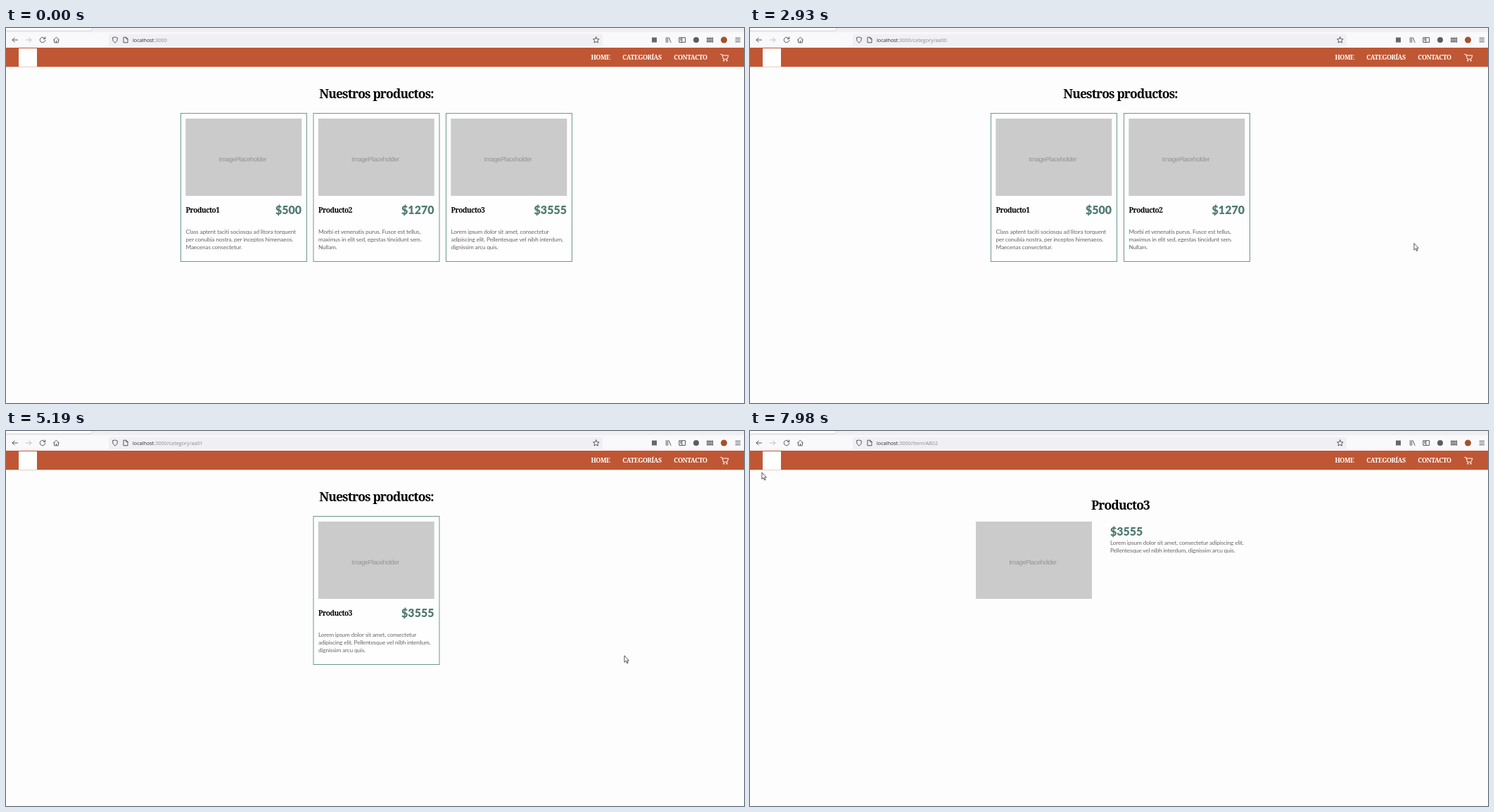
An HTML page that plays this animation: 1049 px wide and 534 px high, repeating every 8000 ms.

```html
<!DOCTYPE html>
<html lang="es">
<head>
<meta charset="utf-8">
<title>Productos</title>
<style>
  html, body { margin: 0; width: 100%; height: 100%; overflow: hidden; background: #fdfdfd; }
  svg { display: block; width: 1049px; height: 534px; }

  .slab { font-family: "Roboto Slab", "Noto Serif", serif; font-weight: 700; letter-spacing: -.05em; }
  .mid { text-anchor: middle; }
  .end { text-anchor: end; }
  .h1 { font-size: 17.5px; }
  .h2 { font-size: 13.1px; }
  .h3 { font-size: 10.1px; }
  .nav { font-size: 9px; fill: #fff; }
  .sub { font-size: 8.6px; fill: #fff; }
  .price { font: 900 16px Lato, sans-serif; fill: #4f7b72; }
  .desc { font: 8.3px Lato, sans-serif; letter-spacing: -.02em; fill: #666; }
  .photo { font: 9.3px "Liberation Sans", Arial, sans-serif; letter-spacing: -.05em; fill: #949494; }
  .url { font: 7.25px "Open Sans", sans-serif; fill: #8b8b8e; }
  .url .host { fill: #2a2a2e; }
  .icon { fill: none; stroke: #56565b; stroke-width: 1; stroke-linecap: round; stroke-linejoin: round; }
  .cursor { fill: #fff; stroke: #26262a; stroke-width: .8; stroke-linejoin: round; }

  .step { animation: 8s step-end infinite; }
  #all, #urlHome { animation-name: untilFirst; }
  #urlOne { animation-name: urlOne; }
  #urlTwo { animation-name: urlTwo; }
  #urlItem { animation-name: urlItem; }
  #title { animation-name: title; }
  #wait { animation-name: wait; }
  #catOne { animation-name: catOne; }
  #catTwo { animation-name: catTwo; }
  #waitItem { animation-name: waitItem; }
  #item { animation-name: item; }
  #menu { animation-name: menu; }
  #hoverOne { animation-name: hoverOne; }
  #hoverTwo { animation-name: hoverTwo; }
  #arrow { animation-name: arrow; }
  #hand { animation-name: hand; }
  #pointer { animation: travel 8s linear infinite; }

  @keyframes untilFirst { 0% { opacity: 1 } 23.875%, 100% { opacity: 0 } }
  @keyframes urlOne { 0%, 51.25%, 100% { opacity: 0 } 23.875% { opacity: 1 } }
  @keyframes urlTwo { 0%, 74.25%, 100% { opacity: 0 } 51.25% { opacity: 1 } }
  @keyframes urlItem { 0% { opacity: 0 } 74.25%, 100% { opacity: 1 } }
  @keyframes title { 0% { opacity: 1 } 74.25%, 100% { opacity: 0 } }
  @keyframes wait { 0%, 36.625%, 64.875%, 100% { opacity: 0 } 23.875%, 51.25% { opacity: 1 } }
  @keyframes catOne { 0%, 51.25%, 100% { opacity: 0 } 36.625% { opacity: 1 } }
  @keyframes catTwo { 0%, 74.25%, 100% { opacity: 0 } 64.875% { opacity: 1 } }
  @keyframes waitItem { 0%, 87.75%, 100% { opacity: 0 } 74.25% { opacity: 1 } }
  @keyframes item { 0% { opacity: 0 } 87.75%, 100% { opacity: 1 } }
  @keyframes menu { 0%, 28%, 54.625%, 100% { opacity: 0 } 16.25%, 43.5% { opacity: 1 } }
  @keyframes hoverOne { 0%, 27.125%, 47.875%, 100% { opacity: 0 } 18.875%, 46.125% { opacity: 1 } }
  @keyframes hoverTwo { 0%, 28%, 54.625%, 100% { opacity: 0 } 27.125%, 47.875% { opacity: 1 } }
  @keyframes arrow {
    0%, 9.25%, 16.25%, 43.5%, 71.625% { opacity: 0 }
    5.75%, 13.625%, 28%, 54.625%, 74.25%, 100% { opacity: 1 }
  }
  @keyframes hand {
    0%, 13.625%, 28%, 54.625%, 74.25%, 100% { opacity: 0 }
    9.25%, 16.25%, 43.5%, 71.625% { opacity: 1 }
  }
  /* the pointer jumps every 70 ms */
  @keyframes travel {
    0% { transform: translate(341px, 513px) }
    5.75% { transform: translate(341px, 513px); animation-timing-function: steps(12, start) }
    16.25% { transform: translate(903px, 74px); animation-timing-function: steps(1, start) }
    17.125% { transform: translate(906px, 46px); animation-timing-function: steps(6, start) }
    22.375% { transform: translate(889px, 67.5px) }
    27.125% { transform: translate(889px, 67.5px); animation-timing-function: steps(9, start) }
    35% { transform: translate(943.8px, 306.5px) }
    39.125% { transform: translate(943.8px, 306.5px); animation-timing-function: steps(6, start) }
    44.375% { transform: translate(908px, 30px); animation-timing-function: steps(6, start) }
    49.625% { transform: translate(894.5px, 95px) }
    51.25% { transform: translate(894.5px, 95px); animation-timing-function: steps(1, start) }
    52.125% { transform: translate(896px, 95.5px) }
    54.625% { transform: translate(896px, 95.5px); animation-timing-function: steps(7, start) }
    60.75% { transform: translate(879px, 319.8px) }
    68.125% { transform: translate(879px, 319.8px); animation-timing-function: steps(7, start) }
    74.25% { transform: translate(460px, 201px) }
    75.125% { transform: translate(460px, 201px); animation-timing-function: steps(4, start) }
    78.625% { transform: translate(511px, 357px); animation-timing-function: steps(2, start) }
    80.375% { transform: translate(517px, 409px) }
    91.875% { transform: translate(517px, 409px); animation-timing-function: steps(9, start) }
    99.75% { transform: translate(66px, 94px); animation-timing-function: steps(1, start) }
    100% { transform: translate(16.8px, 59px) }
  }
</style>
</head>
<body>
<svg viewBox="0 0 1049 534">
  <defs>
    <g id="photo">
      <rect width="165" height="110" fill="#cbcbcb"/>
      <text class="photo mid" x="81" y="60.5">ImagePlaceholder</text>
    </g>
    <g id="frame">
      <rect x=".5" y="121.5" width="179" height="211" fill="#fefefe" stroke="#6d978f"/>
      <use href="#photo" x="7.3" y="129"/>
    </g>
    <g id="p1">
      <use href="#frame"/>
      <text class="slab h3" x="7.5" y="262.5">Producto1</text>
      <text class="price end" x="172" y="264.5">$500</text>
      <text class="desc">
        <tspan x="7.5" y="292.5">Class aptent taciti sociosqu ad litora torquent</tspan>
        <tspan x="7.5" y="303.5">per conubia nostra, per inceptos himenaeos.</tspan>
        <tspan x="7.5" y="314.5">Maecenas consectetur.</tspan>
      </text>
    </g>
    <g id="p2">
      <use href="#frame"/>
      <text class="slab h3" x="7.5" y="262.5">Producto2</text>
      <text class="price end" x="172" y="264.5">$1270</text>
      <text class="desc">
        <tspan x="7.5" y="292.5">Morbi et venenatis purus. Fusce est tellus,</tspan>
        <tspan x="7.5" y="303.5">maximus in elit sed, egestas tincidunt sem.</tspan>
        <tspan x="7.5" y="314.5">Nullam.</tspan>
      </text>
    </g>
    <g id="p3">
      <use href="#frame"/>
      <text class="slab h3" x="7.5" y="262.5">Producto3</text>
      <text class="price end" x="172" y="264.5">$3555</text>
      <text class="desc">
        <tspan x="7.5" y="292.5">Lorem ipsum dolor sit amet, consectetur</tspan>
        <tspan x="7.5" y="303.5">adipiscing elit. Pellentesque vel nibh interdum,</tspan>
        <tspan x="7.5" y="314.5">dignissim arcu quis.</tspan>
      </text>
    </g>
  </defs>

  <!-- browser bar -->
  <rect width="1049" height="28" fill="#f9f9fb"/>
  <rect width="1049" height="6" fill="#f0f0f2"/>
  <rect x="-4" y="-6" width="126.5" height="10" rx="2" fill="#fff" stroke="#c9c9ce" stroke-width=".8"/>
  <rect x="146" y="8.5" width="702" height="17.5" rx="2" fill="#f0f0f4"/>
  <g class="icon">
    <path d="M16.5 17H9M12 14L9 17L12 20"/>
    <path d="M28.5 17H36M33 14L36 17L33 20" stroke="#bdbdc2"/>
    <path d="M55.3 15A3.8 3.8 0 1 0 55.8 17.5M55.8 12.8V15.4H53.2"/>
    <path d="M67.5 17L71.5 13.2L75.5 17M68.7 16.5V20.8H74.3V16.5M71.5 20.5V18.3"/>
    <path d="M155 13L158.6 14.2Q158.6 19.3 155 21.2Q151.4 19.3 151.4 14.2Z"/>
    <path d="M167.4 13.2H170.8L173 15.4V20.8H167.4ZM170.8 13.2V15.4H173"/>
    <path d="M838.8 12.8L840.1 15.6L843.1 15.9L840.9 18L841.5 21L838.8 19.5L836.1 21L836.7 18L834.5 15.9L837.5 15.6Z"/>
    <path d="M938.4 13.5V20.5M940.6 13.5V20.5M942.3 13.7L945 20.4"/>
    <path d="M957.2 13.7H965.6V20.4H957.2ZM960.8 13.7V20.4M958.5 15.6H959.5M958.5 17.2H959.5"/>
    <path d="M997 13.5V20.5M999.4 13.5V20.5M1001.8 13.5V20.5M1004.2 13.5V20.5M996.2 15.2H1005M996.2 18.8H1005" stroke-width="1.1"/>
    <path d="M1037 14.3H1043.5M1037 17H1043.5M1037 19.7H1043.5"/>
  </g>
  <rect x="918" y="13.5" width="7" height="7" fill="#66666b"/>
  <circle cx="981" cy="17" r="4" fill="#5c5c61"/>
  <circle cx="1020.5" cy="17" r="4.5" fill="#a5512b"/>
  <text class="url" x="180" y="20"><tspan class="host">localhost</tspan>:3000<tspan id="urlBase"></tspan></text>
  <g class="url">
    <g id="urlHome" class="step"></g>
    <text id="urlOne" class="step" x="229" y="20">/category/aa00</text>
    <text id="urlTwo" class="step" x="229" y="20">/category/aa01</text>
    <text id="urlItem" class="step" x="229" y="20">/item/AB02</text>
  </g>

  <!-- site header -->
  <rect y="28" width="1049" height="27.3" fill="#bf5734"/>
  <rect x="18" y="29" width="26" height="26" fill="#fff"/>
  <g class="slab nav mid">
    <text x="845" y="45.4">HOME</text>
    <text x="904" y="45.4">CATEGORÍAS</text>
    <text x="973" y="45.4">CONTACTO</text>
  </g>
  <path class="icon" style="stroke:#fff" d="M1015.8 37.6H1017.8L1019.6 44.2H1025.2L1026.8 39H1018.2"/>
  <g fill="#fff"><circle cx="1020.3" cy="46.4" r="1.1"/><circle cx="1024.6" cy="46.4" r="1.1"/></g>

  <!-- pages -->
  <text id="title" class="slab h1 mid step" x="526.5" y="100">Nuestros productos:</text>
  <text id="wait" class="slab h2 mid step" x="526.5" y="130.5">Cargando</text>
  <g id="all" class="step">
    <use href="#p1" x="248"/><use href="#p2" x="436.5"/><use href="#p3" x="625"/>
  </g>
  <g id="catOne" class="step">
    <use href="#p1" x="342"/><use href="#p2" x="531"/>
  </g>
  <g id="catTwo" class="step"><use href="#p3" x="436.5"/></g>
  <text id="waitItem" class="slab h2 mid step" x="526.5" y="95.5">Cargando</text>
  <g id="item" class="step">
    <text class="slab h1 mid" x="526.5" y="111.5">Producto3</text>
    <use href="#photo" x="321" y="129"/>
    <text class="price" x="512" y="148.5">$3555</text>
    <text class="desc">
      <tspan x="512" y="161.5">Lorem ipsum dolor sit amet, consectetur adipiscing elit.</tspan>
      <tspan x="512" y="172.5">Pellentesque vel nibh interdum, dignissim arcu quis.</tspan>
    </text>
  </g>

  <!-- dropdown -->
  <g id="menu" class="step">
    <rect x="867" y="55" width="71.7" height="54" fill="#bf5734"/>
    <rect id="hoverOne" class="step" x="867" y="55" width="71.7" height="27.3" fill="#7b3a2d"/>
    <rect id="hoverTwo" class="step" x="867" y="82" width="71.7" height="27" fill="#7b3a2d"/>
    <text class="slab sub mid" x="903" y="72.2">categoria1</text>
    <text class="slab sub mid" x="903" y="99.2">categoria2</text>
  </g>

  <g id="pointer" class="cursor">
    <path id="arrow" class="step" d="M0 0V9.6L2.2 7.6L3.8 11L5.2 10.4L3.7 7.1H6.5Z"/>
    <path id="hand" class="step" stroke-width=".6" d="M-.9 .6A.9 .9 0 0 1 .9 .6V3.6L4.4 4.3Q5.7 4.7 5.6 6.2L5 9.2V11H-.6V9.6L-3.6 6.2Q-3.9 5.1 -2.6 5.2L-.9 6.6Z"/>
  </g>
</svg>
</body>
</html>
```
